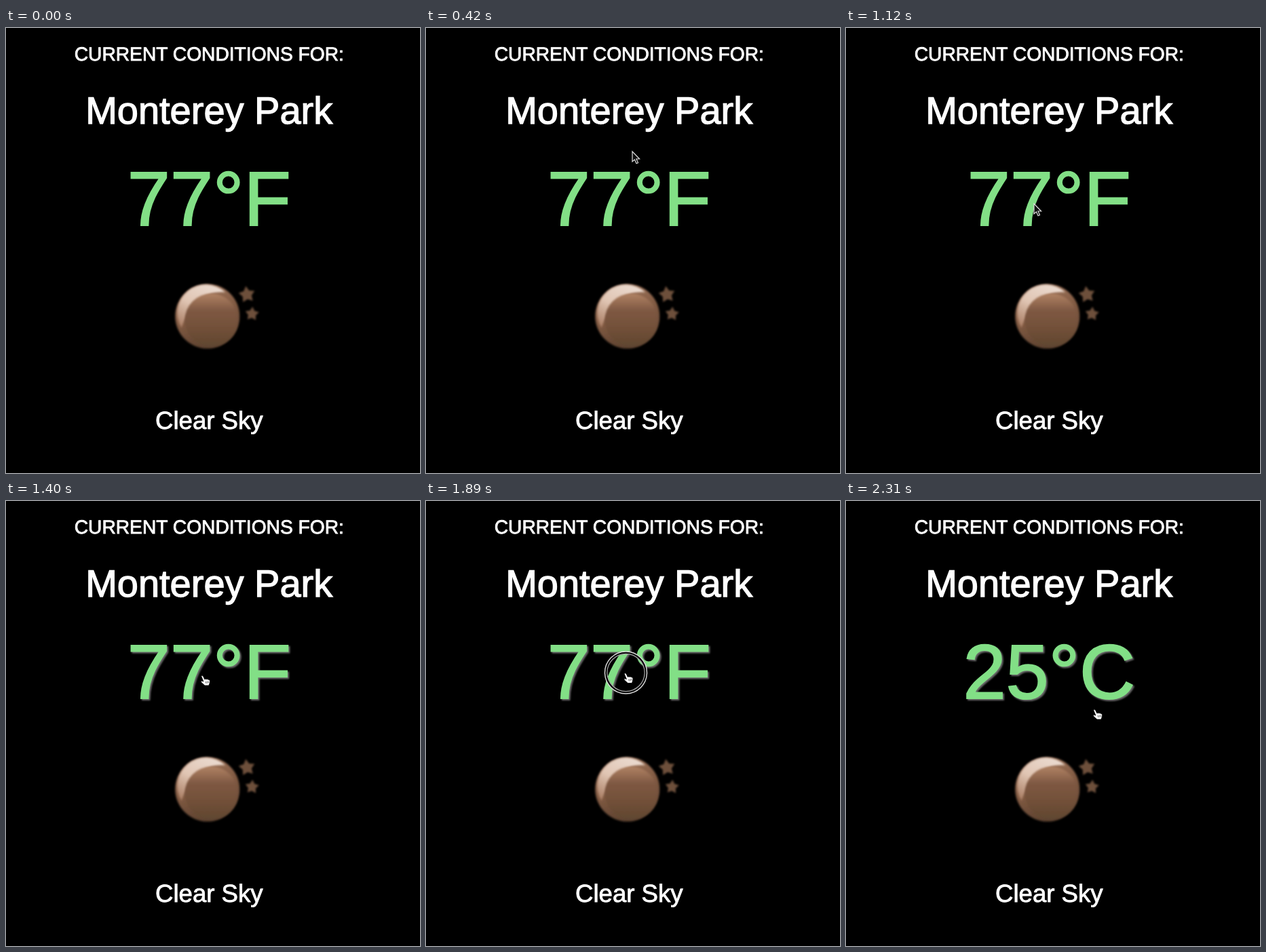
Animation, 610 px wide and 656 px high, one loop 2.38 s. Source, as an HTML page:

```html
<!DOCTYPE html>
<html lang="en">
<head>
<meta charset="utf-8">
<title>Current conditions</title>
<style>
  html, body { margin: 0; width: 100%; height: 100%; overflow: hidden; background: #000; }
  svg { display: block; width: 610px; height: 656px; }
  text {
    font-family: "Liberation Sans", Arial, Helvetica, sans-serif;
    text-anchor: middle; text-rendering: geometricPrecision;
    fill: #fff; stroke: #fff; stroke-width: .9px;
  }
  #city { stroke-width: 1.3px; }
  #temp { font-size: 113.5px; fill: #82df86; stroke: #82df86; stroke-width: 2px; }
  #temp.hover { filter: drop-shadow(2px 2px 1.2px #6c6c6c); }
</style>
</head>
<body>
<svg viewBox="0 0 610 656">
  <defs>
    <linearGradient id="body" x1=".2" y1="0" x2=".55" y2="1">
      <stop offset="0" stop-color="#a37a62"/>
      <stop offset=".45" stop-color="#855d45"/>
      <stop offset="1" stop-color="#5a402e"/>
    </linearGradient>
    <linearGradient id="face" x1="0" y1="0" x2="0" y2="1">
      <stop offset="0" stop-color="#b08263"/>
      <stop offset=".32" stop-color="#7e5842"/>
      <stop offset=".65" stop-color="#725039"/>
      <stop offset="1" stop-color="#5f462f"/>
    </linearGradient>
    <linearGradient id="shine" x1=".7" y1="0" x2=".1" y2="1">
      <stop offset="0" stop-color="#eadacf"/>
      <stop offset=".5" stop-color="#e0c5b3"/>
      <stop offset="1" stop-color="#a87c62"/>
    </linearGradient>
    <filter id="soft" x="-20%" y="-20%" width="140%" height="140%"><feGaussianBlur stdDeviation="1.4"/></filter>
    <filter id="softer" x="-20%" y="-20%" width="140%" height="140%"><feGaussianBlur stdDeviation="1.8"/></filter>
  </defs>
  <rect width="610" height="656"/>
  <text x="299.3" y="47.8" font-size="28.2">CURRENT CONDITIONS FOR:</text>
  <text id="city" x="299.2" y="140.6" font-size="56">Monterey Park</text>
  <text id="temp" x="299.3" y="290.5">77°F</text>

  <circle cx="296.8" cy="425" r="47.5" fill="url(#body)" filter="url(#soft)"/>
  <path d="M258.5 442A42 42 0 0 1 323 389.5Q278 386 258.5 442Z" fill="url(#shine)" filter="url(#softer)"/>
  <circle cx="302.5" cy="430.5" r="39" fill="url(#face)" filter="url(#softer)"/>
  <g id="stars" fill="#6d4f3b" filter="url(#soft)"></g>

  <text x="299.3" y="590.7" font-size="36.6">Clear Sky</text>

  <g id="ring" fill="none">
    <circle cx="294.5" cy="253" r="29.3" stroke="#000" stroke-width="4"/>
    <circle cx="294.5" cy="253" r="31" stroke="#ddd" stroke-width="1.4"/>
    <circle cx="294.5" cy="253" r="27.6" stroke="#aaa" stroke-width="1.2"/>
  </g>
  <path id="arrow" d="M0 0V15L3.4 12 6 17.7 8.5 16.6 6 11H10.6Z" fill="#111" stroke="#ddd" stroke-width="1.2"/>
  <g id="hand">
    <path d="M-.8 .8Q.4-1 1.9.6L4.4 5.5Q6 4.1 7.2 5.4Q8.6 4.4 9.6 5.8Q12 5.4 12 8L11.6 11 10.4 14.5H4.4L-.6 10Q-2 7.8 0 7.8L2.4 8.6Z" fill="#fff" stroke="#000" stroke-width=".8"/>
    <path d="M5.4 8.6l1.2 3M7.4 8.2l1.2 3M9.4 7.9l.8 2.6" stroke="#222" stroke-width=".7"/>
  </g>
</svg>
<script>
const LOOP = 2380, STEP = 70, ENTER = 70, HOVER = 1330, PRESS = 1820, RELEASE = 1960;
const el = id => document.getElementById(id);
const [temp, ring, arrow, hand] = ["temp", "ring", "arrow", "hand"].map(el);

// pointer path: time, x, y
const path = [
  [70, 340, 2], [420, 304, 182], [560, 285, 235], [700, 277, 259],
  [1260, 277, 259], [1330, 284, 258], [1400, 288.5, 257.5],
  [1820, 293, 254], [1960, 293, 254], [2100, 311, 266], [2310, 365.5, 307.5]
];

function pointerAt(t) {
  const i = path.findIndex(p => p[0] >= t);
  if (i < 1) return path[i < 0 ? path.length - 1 : 0].slice(1);
  const [a, b] = [path[i - 1], path[i]];
  const k = (t - a[0]) / (b[0] - a[0]);
  return [1, 2].map(j => a[j] + (b[j] - a[j]) * k);
}

function addStar(cx, cy, r, turn) {
  const points = Array.from({ length: 10 }, (_, i) => {
    const angle = (turn + i * 36 - 90) * Math.PI / 180;
    const radius = i % 2 ? r * .55 : r;
    return [cx + radius * Math.cos(angle), cy + radius * Math.sin(angle)];
  });
  const star = document.createElementNS("http://www.w3.org/2000/svg", "polygon");
  star.setAttribute("points", points.join(" "));
  el("stars").append(star);
}
addStar(355, 393, 12.5, -8);
addStar(362.5, 421.5, 10.5, 4);

const show = (node, on) => node.setAttribute("visibility", on ? "visible" : "hidden");

function draw(now) {
  const t = Math.floor(now % LOOP / STEP) * STEP;
  const over = t >= HOVER;
  const at = `translate(${pointerAt(t)})`;
  arrow.setAttribute("transform", at);
  hand.setAttribute("transform", at);
  show(arrow, t >= ENTER && !over);
  show(hand, over);
  show(ring, t >= PRESS && t < RELEASE);
  temp.classList.toggle("hover", over);
  temp.textContent = t < RELEASE ? "77°F" : "25°C";
}

const start = performance.now();
function tick() {
  draw(performance.now() - start);
  requestAnimationFrame(tick);
}
tick();
</script>
</body>
</html>
```
